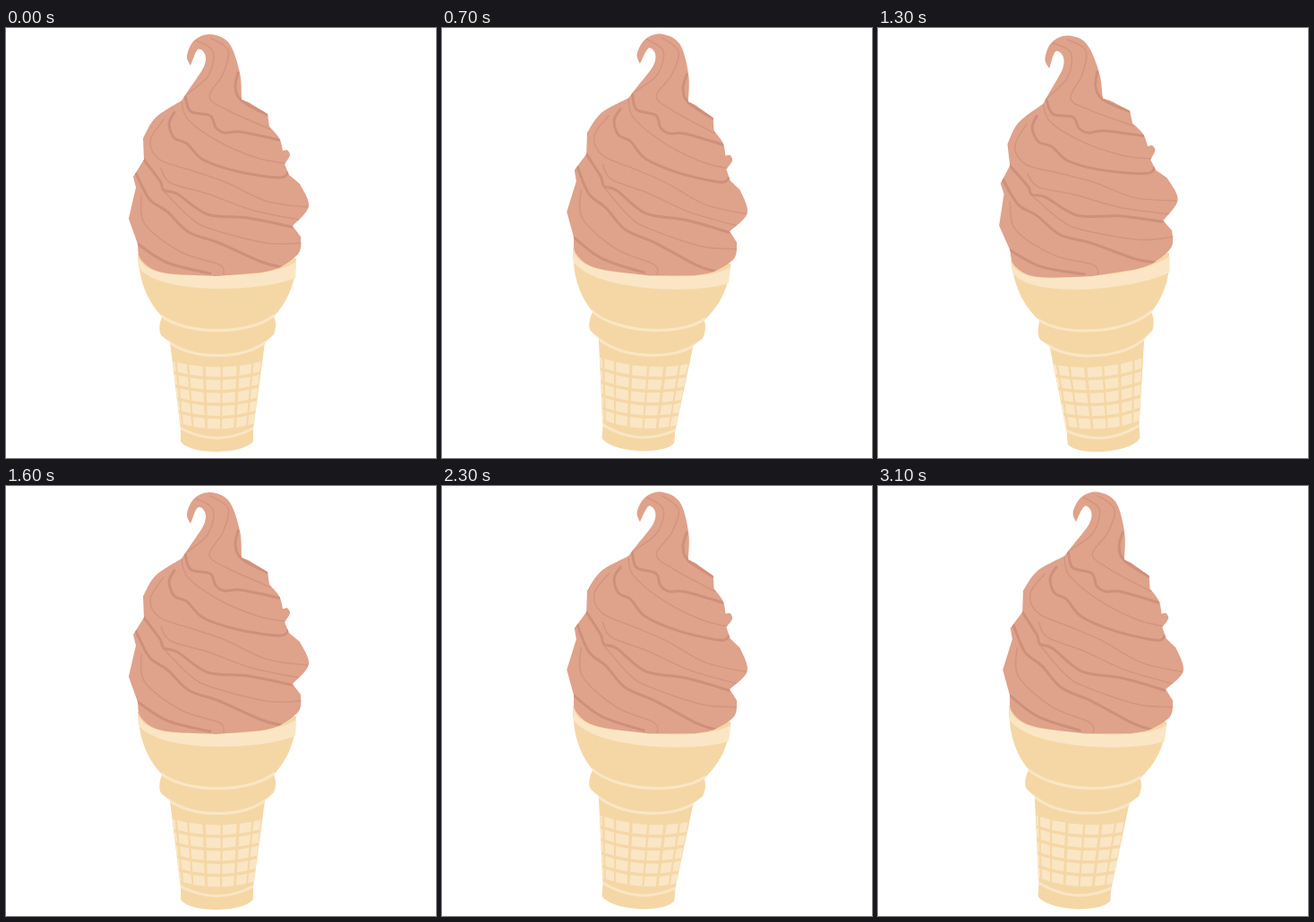
An HTML page with a canvas for the animation above (3200 ms loop, 480 by 480 pixels).

```html
<!DOCTYPE html>
<html lang="en">
<head>
<meta charset="utf-8">
<title>Wobbling soft serve</title>
<style>
html, body { margin: 0; width: 100%; height: 100%; overflow: hidden; background: #fff; }
canvas { display: block; width: 480px; height: 480px; }
</style>
</head>
<body>
<canvas id="stage" width="480" height="480"></canvas>
<script>
const ctx = document.getElementById('stage').getContext('2d');

const STEP = 100;
const TILTS = [0, -4.3, 0, 4.3];
const CREAM = '#dfa28b', FOLD = '#ce907b', CREASE = '#d3957f';
const CONE = '#f5d7a6', PALE = '#fae6c5';

// Smooth Catmull-Rom curve through x, y pairs.
function curve(path, join, ...pts) {
  const last = pts.length / 2 - 1;
  const at = (i, axis) => pts[2 * Math.max(0, Math.min(last, i)) + axis];
  const lead = (i, axis, sign) =>
    at(i, axis) + sign * (at(i + 1, axis) - at(i - 1, axis)) / 6;
  if (join) path.lineTo(at(0, 0), at(0, 1));
  else path.moveTo(at(0, 0), at(0, 1));
  for (let i = 0; i < last; i++) {
    path.bezierCurveTo(
      lead(i, 0, 1), lead(i, 1, 1),
      lead(i + 1, 0, -1), lead(i + 1, 1, -1),
      at(i + 1, 0), at(i + 1, 1));
  }
}

const swirl = new Path2D();
const edge = (...pts) => curve(swirl, true, ...pts);
curve(swirl, false, 206, 42, 202, 31, 210, 14, 228, 7, 249, 17, 261, 50, 263, 80);
edge(271, 83, 292, 96);
edge(294, 110, 305, 123, 309, 137);
edge(314, 136, 317, 142, 311, 152);
edge(316, 164);
edge(328, 174, 338, 199, 320, 221);
edge(329, 233, 327, 251, 306, 267, 285, 273);
edge(235, 277, 175, 273, 151, 259, 147, 241);
edge(137, 213, 145, 178);
edge(142, 166, 154, 147);
edge(153, 123, 167, 100, 196, 81);
edge(206, 66, 221, 43, 222, 29, 214, 24, 206, 42);
swirl.closePath();

const folds = new Path2D();
const fold = (...pts) => curve(folds, false, ...pts);
fold(259, 50, 256, 66, 263, 81, 292, 97);
fold(200, 76, 206, 93, 228, 98, 234, 111, 244, 117, 262, 116, 305, 125);
fold(188, 94, 182, 107, 188, 123, 202, 129, 220, 147, 258, 160, 305, 167, 315, 161);
fold(154, 147, 172, 171, 176, 181, 191, 185, 225, 208, 270, 212, 319, 222);
fold(145, 162, 160, 191, 180, 205, 204, 228, 238, 240, 285, 261, 308, 267);
fold(147, 241, 180, 262, 228, 274);

const creases = new Path2D();
const crease = (...pts) => curve(creases, false, ...pts);
crease(212, 14, 231, 26, 226, 53, 202, 74);
crease(228, 11, 248, 25, 242, 52, 227, 77, 248, 92, 295, 113);
crease(196, 82, 203, 102, 236, 126, 280, 145, 312, 151);
crease(176, 102, 161, 126, 172, 147, 207, 159, 245, 172, 290, 193, 336, 200);
crease(173, 157, 184, 173, 225, 185, 274, 203, 327, 214);
crease(175, 181, 205, 211, 228, 224, 290, 240, 329, 240);
crease(151, 187, 155, 219, 195, 250, 238, 264, 243, 275);

const cone = new Path2D(
  'M147 252 Q147 262 149 270 Q154 301 174 322 Q169 336 173 343 L183 351' +
  'L195 448 V462 Q205 473 236 473 Q268 472 276 461 V448' +
  'L289 351 L299 342 Q303 331 299 322 Q320 299 323 270 L324 257 Z');

const rim = new Path2D(
  'M147 252 Q150 274 195 276 H260 Q305 273 324 261 L323 279' +
  'Q292 291 236 291 Q170 290 149 269 Z');

// A sagging line between two ends of equal height.
function band(left, right, y, sag) {
  const drop = y + sag * 1.3;
  ctx.beginPath();
  ctx.moveTo(left, y);
  ctx.bezierCurveTo(left + 28, drop, right - 28, drop, right, y);
  ctx.strokeStyle = PALE;
  ctx.lineWidth = 3;
  ctx.stroke();
}

// Left edges and widths of the waffle columns, across -1 to 1.
const lefts = [-1, -.9, -.63, -.26, .12, .5, .81];
const widths = [.05, .22, .3, .33, .31, .26, .16];

function wafflePoint(u, y) {
  const half = 53 - (y - 352) * 0.113;
  return [236 + u * half, y - 6.5 * u * u];
}

function drawWaffle() {
  ctx.fillStyle = PALE;
  for (let row = 0; row < 5; row++) {
    const top = 378.5 + row * 14.5, bottom = top + 11;
    lefts.forEach((l, i) => {
      const r = l + widths[i];
      ctx.beginPath();
      ctx.moveTo(...wafflePoint(l, top));
      ctx.lineTo(...wafflePoint(r, top));
      ctx.lineTo(...wafflePoint(r, bottom));
      ctx.lineTo(...wafflePoint(l, bottom));
      ctx.fill();
    });
  }
}

function fill(path, color) {
  ctx.fillStyle = color;
  ctx.fill(path);
}

function stroke(path, color, width) {
  ctx.strokeStyle = color;
  ctx.lineWidth = width;
  ctx.stroke(path);
}

function inside(path, paint) {
  ctx.save();
  ctx.clip(path);
  paint();
  ctx.restore();
}

function drawCone() {
  fill(cone, CONE);
  fill(rim, PALE);
  inside(cone, () => {
    band(173, 299, 321, 17);
    band(181, 291, 350, 16);
    band(195, 276, 447, 11);
  });
  drawWaffle();
}

function drawSwirl() {
  fill(swirl, CREAM);
  inside(swirl, () => {
    stroke(creases, CREASE, 1.5);
    stroke(folds, FOLD, 3);
  });
}

function draw(time) {
  const tilt = TILTS[Math.floor(time / STEP) % TILTS.length];
  ctx.fillStyle = '#fff';
  ctx.fillRect(0, 0, 480, 480);
  ctx.save();
  ctx.translate(240, 240);
  ctx.rotate(tilt * Math.PI / 180);
  ctx.translate(-240, -240);
  ctx.lineCap = ctx.lineJoin = 'round';
  drawCone();
  drawSwirl();
  ctx.restore();
}

const start = performance.now();
function tick() {
  draw(performance.now() - start);
  requestAnimationFrame(tick);
}
tick();
</script>
</body>
</html>
```
